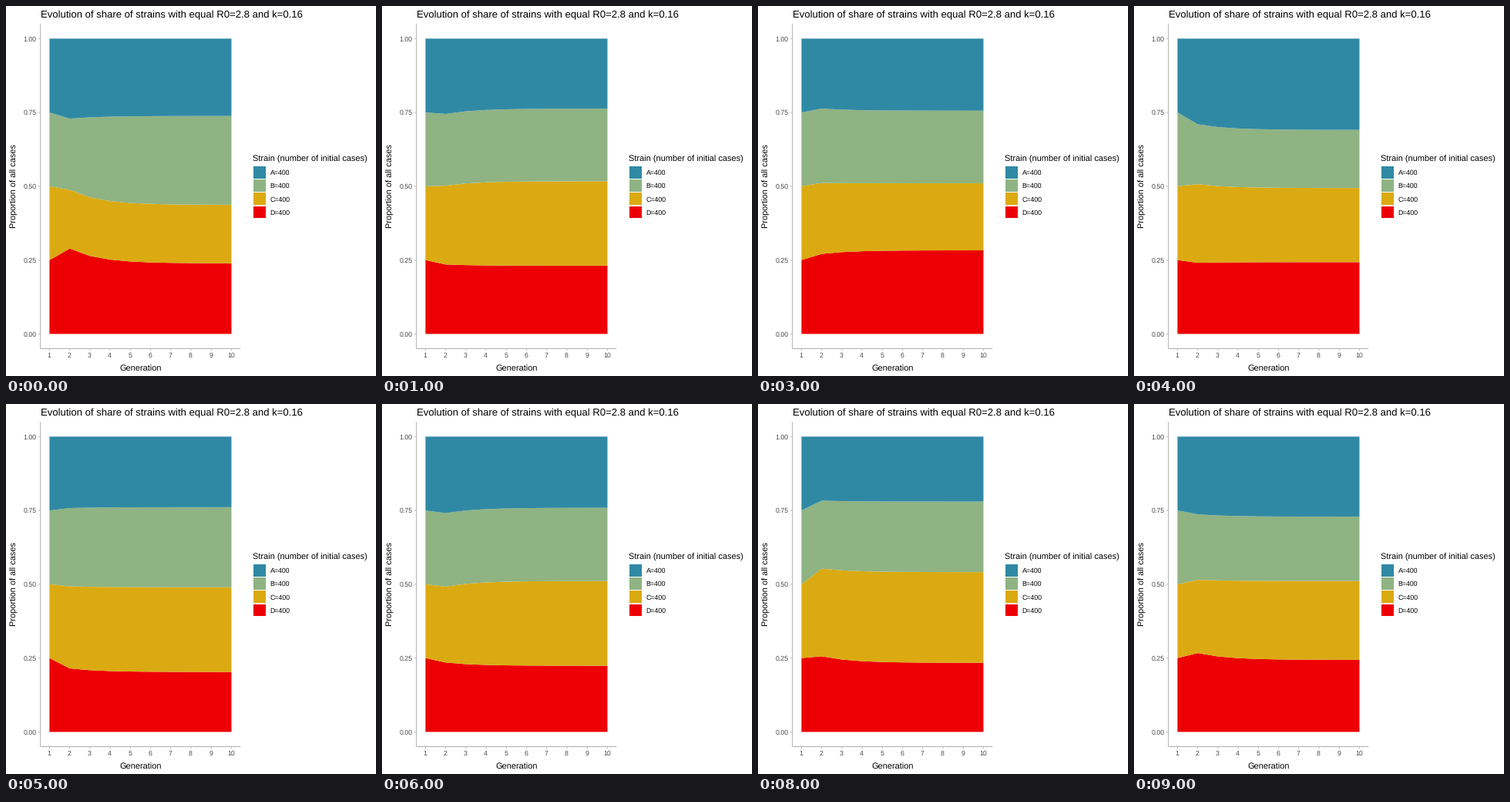
Write a matplotlib script that moves like this. It is 480 px wide and 480 px high and loops after 10000 ms.

```python
import matplotlib.pyplot as plt
import numpy as np
from matplotlib.animation import FuncAnimation
from matplotlib.patches import Polygon, Rectangle

plt.rcParams["font.family"] = "Liberation Sans"
plt.rcParams["text.hinting"] = "none"

SIZE, DPI = 480, 100
PX = 72 / DPI
LEFT, RIGHT, TOP, BOTTOM = 44.6, 304.3, 23.3, 444.5
MID_X, MID_Y = (LEFT + RIGHT) / 2, (TOP + BOTTOM) / 2
GREY, DARK = "#b3b3b3", "#4d4d4d"
COLORS = ["#3089a4", "#8fb382", "#dbaa12", "#ec0004"]
GENS = np.arange(1, 11)
START = np.array([0.25, 0.5, 0.75])

# Each run: upper edges of D, C and B at generation 2, then where they settle
RUNS = [
    ((0.289, 0.488, 0.729), (0.239, 0.437, 0.738)),
    ((0.235, 0.502, 0.745), (0.231, 0.517, 0.763)),
    ((0.250, 0.505, 0.755), (0.245, 0.507, 0.757)),
    ((0.271, 0.511, 0.763), (0.283, 0.510, 0.756)),
    ((0.241, 0.507, 0.710), (0.243, 0.494, 0.691)),
    ((0.215, 0.493, 0.758), (0.203, 0.490, 0.761)),
    ((0.235, 0.492, 0.741), (0.224, 0.511, 0.759)),
    ((0.245, 0.510, 0.768), (0.243, 0.513, 0.774)),
    ((0.256, 0.553, 0.783), (0.234, 0.541, 0.780)),
    ((0.267, 0.515, 0.737), (0.244, 0.511, 0.729)),
]


def px_x(gen):
    return 56.4 + 26.23 * (gen - 1)


def px_y(share):
    return 425.4 - 383.1 * share


def edges_of(run):
    """Random drift halves with every generation after the second."""
    first, end = np.array(RUNS[run])[:, :, None]
    inner = end + (first - end) * 0.5 ** (GENS - 2)
    inner[:, 0] = START
    return np.vstack([np.zeros(len(GENS)), inner, np.ones(len(GENS))])


fig = plt.figure(figsize=(SIZE / DPI, SIZE / DPI), dpi=DPI, facecolor="white")
ax = fig.add_axes([0, 0, 1, 1])
ax.set(xlim=(0, SIZE), ylim=(SIZE, 0))
ax.axis("off")


def label(x, y, text, size, color="black", **kw):
    ax.text(x, y, text, fontsize=size * PX, color=color, va="baseline", **kw)


def line(xs, ys, width):
    ax.plot(xs, ys, color=GREY, lw=width * PX, solid_capstyle="butt", snap=False)


label(44.6, 15, "Evolution of share of strains with equal R0=2.8 and k=0.16", 13.12)
label(MID_X, 474, "Generation", 11, ha="center")
label(14, MID_Y, "Proportion of all cases", 11, ha="center",
      rotation=90, rotation_mode="anchor")

line([LEFT, LEFT], [TOP, BOTTOM], 1.07)
line([LEFT, RIGHT], [BOTTOM, BOTTOM], 1.07)
for share in np.linspace(0, 1, 5):
    y = px_y(share)
    line([LEFT - 2.75, LEFT], [y, y], 0.8)
    label(39.7, y + 3.2, f"{share:.2f}", 8.8, DARK, ha="right")
for gen in GENS:
    x = px_x(gen)
    line([x, x], [BOTTOM, BOTTOM + 2.75], 0.8)
    label(x - 0.5, 456.3, str(gen), 8.8, DARK, ha="center")

label(320.2, 202, "Strain (number of initial cases)", 11)
for i, (name, color) in enumerate(zip("ABCD", COLORS)):
    y = 207.7 + 17.28 * i
    ax.add_patch(Rectangle((320.9, y), 15.9, 15.9, fc=color, lw=0))
    label(342.6, y + 11.3, f"{name}=400", 8.8)

areas = [ax.add_patch(Polygon([(0, 0), (1, 1)], fc=c, lw=0, zorder=3))
         for c in reversed(COLORS)]


def draw(run):
    edges = px_y(edges_of(run))
    x = px_x(GENS)
    for area, low, high in zip(areas, edges, edges[1:]):
        area.set_xy(np.column_stack([np.r_[x, x[::-1]], np.r_[low, high[::-1]]]))
    return areas


anim = FuncAnimation(fig, draw, frames=len(RUNS), interval=1000, repeat=True,
                     init_func=lambda: draw(0))
plt.show()
```
